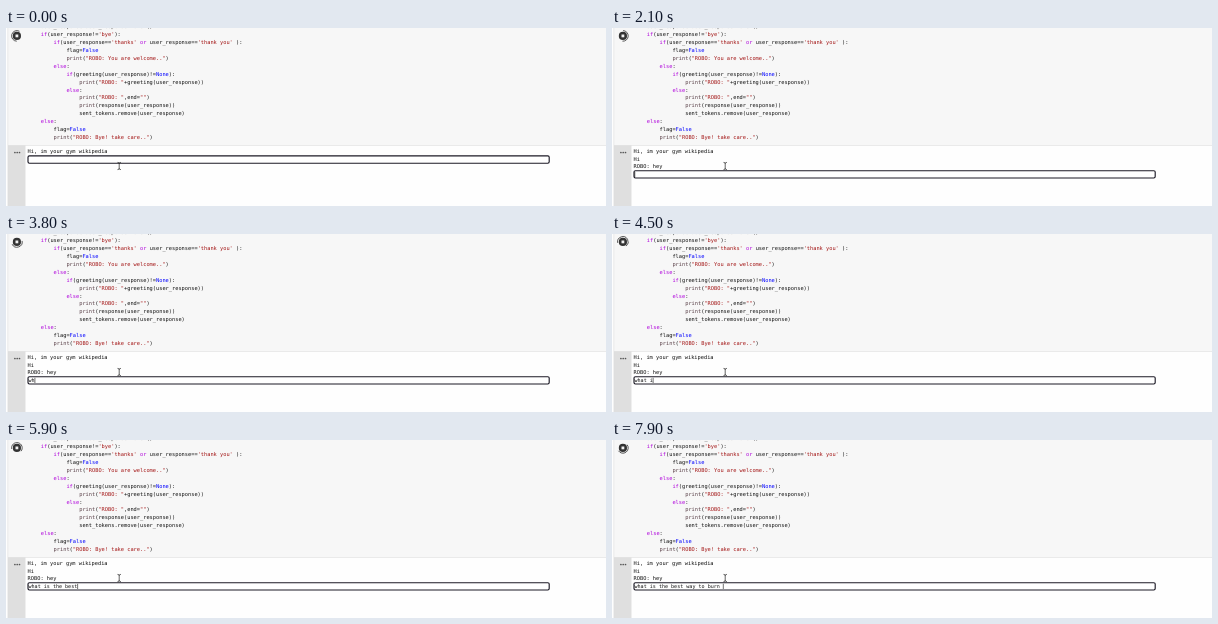
Write an HTML page that moves like this. It is 600 px wide and 178 px high and loops after 8000 ms.

```html
<!DOCTYPE html>
<html lang="en">
<head>
<meta charset="utf-8">
<title>Notebook chat</title>
<style>
  html, body { margin: 0; width: 100%; height: 100%; overflow: hidden; background: #fff; }
  svg { display: block; width: 600px; height: 178px; }
  text {
    font: 5.32px "DejaVu Sans Mono", "Liberation Mono", monospace;
    white-space: pre;
    text-rendering: geometricPrecision;
    fill: #111;
  }
  #typed { font-size: 5.07px; }
  .keyword { fill: #af00db; }
  .string { fill: #a31515; }
  .builtin { fill: #5a4048; }
  .constant { fill: #0000ff; }
</style>
</head>
<body>
<svg viewBox="0 0 600 178">
  <rect width="600" height="178" fill="#fefefe"/>
  <rect x="2" width="598" height="117.5" fill="#f7f7f7"/>
  <rect x="2" y="117" width="17.5" height="61" fill="#dfdfdf"/>
  <path d="M2 117.5H600" stroke="#e4e4e4" stroke-width=".7"/>
  <path d="M1.8 0V178" stroke="#dedede" stroke-width=".6"/>
  <g id="code"></g>

  <g transform="translate(10.9 7.9)">
    <circle r="4.1" fill="#333"/>
    <rect x="-1.4" y="-1.4" width="2.8" height="2.8" fill="#f2f2f2"/>
    <path id="spinner" fill="none" stroke="#444" stroke-width=".9"/>
  </g>

  <g fill="#555">
    <circle cx="8.9" cy="124.5" r=".85"/>
    <circle cx="11.2" cy="124.5" r=".85"/>
    <circle cx="13.5" cy="124.5" r=".85"/>
  </g>

  <g id="output"></g>
  <g id="prompt">
    <rect x="22" y="127.9" width="521.2" height="7.3" rx="1.4" fill="#fff" stroke="#1c1a26" stroke-width="1.15"/>
    <text id="typed" x="22.5" y="133.2"></text>
    <path id="caret" stroke="#111" stroke-width=".6"/>
  </g>

  <path d="M111.5 134.4Q113.2 134.4 113.2 135.4Q113.2 134.4 114.9 134.4M113.2 135V141M111.5 141.6Q113.2 141.6 113.2 140.6Q113.2 141.6 114.9 141.6"
        fill="none" stroke="#222" stroke-width=".7"/>
</svg>
<script>
const LOOP = 8000;
const CHAR = 5.32 * 0.602;
const INPUT_CHAR = 5.07 * 0.602;
const LINE = 7.4;
const SENT = 1700, REPLIED = 1900;
const QUESTION = 'what is the best way to burn ';

// [time in ms, characters present]
const GREETING_KEYS = [[1000, 0], [1250, 2]];
const QUESTION_KEYS = [[3450, 0], [3800, 2], [5100, 10], [6800, 23], [7850, 29]];

const CODE = `user_response=user_response.lower()
if(user_response!='bye'):
    if(user_response=='thanks' or user_response=='thank you' ):
        flag=False
        print("ROBO: You are welcome..")
    else:
        if(greeting(user_response)!=None):
            print("ROBO: "+greeting(user_response))
        else:
            print("ROBO: ",end="")
            print(response(user_response))
            sent_tokens.remove(user_response)
else:
    flag=False
    print("ROBO: Bye! take care..")`.split('\n');

const $ = id => document.getElementById(id);

function add(parent, tag, attrs, content = '') {
  const node = document.createElementNS('http://www.w3.org/2000/svg', tag);
  for (const name in attrs) node.setAttribute(name, attrs[name]);
  node.textContent = content;
  return parent.appendChild(node);
}

function classify(token) {
  if (/^['"]/.test(token)) return 'string';
  if (/^(if|else|or)$/.test(token)) return 'keyword';
  if (/^(None|False)$/.test(token)) return 'constant';
  return token === 'print' ? 'builtin' : '';
}

CODE.forEach((line, row) => {
  const source = line.trimStart();
  const indent = line.length - source.length;
  const text = add($('code'), 'text', { x: 34.8 + indent * CHAR, y: 0.4 + row * 7.89 });
  for (const token of source.match(/'[^']*'|"[^"]*"|\w+|[^\w'"]+/g)) {
    add(text, 'tspan', { class: classify(token) }, token);
  }
});

const [, sentLine, replyLine] = ['Hi, im your gym wikipedia', 'Hi', 'ROBO: hey'].map(
  (words, row) => add($('output'), 'text', { x: 21.6, y: 125.3 + row * LINE }, words));

function typedCount(keys, time) {
  let count = 0;
  for (let i = 1; i < keys.length; i++) {
    const [t0, n0] = keys[i - 1], [t1, n1] = keys[i];
    if (time >= t0) count = n0 + (n1 - n0) * Math.min(1, (time - t0) / (t1 - t0));
  }
  return Math.floor(count + 1e-6);
}

function caretVisible(time) {
  if (time < 1000) return time >= 200 && time < 700;
  if (time >= REPLIED && time < 3450) return (time - REPLIED) % 1000 < 500;
  return true;
}

function drawSpinner(time) {
  const radius = 5.3;
  const start = time / 1400 * 2 * Math.PI + 1.6;
  const sweep = 3.6 + 0.9 * Math.sin(time / LOOP * 12 * Math.PI);
  const point = a => `${radius * Math.cos(a)} ${radius * Math.sin(a)}`;
  $('spinner').setAttribute('d',
    `M${point(start)}A${radius} ${radius} 0 ${sweep > Math.PI ? 1 : 0} 1 ${point(start + sweep)}`);
}

function show(node, visible) {
  node.setAttribute('visibility', visible ? 'inherit' : 'hidden');
}

function render(time) {
  const replied = time >= REPLIED;
  const value = replied
    ? QUESTION.slice(0, typedCount(QUESTION_KEYS, time))
    : 'Hi'.slice(0, typedCount(GREETING_KEYS, time));

  show(sentLine, time >= SENT);
  show(replyLine, replied);
  show($('prompt'), time < SENT || replied);
  $('prompt').setAttribute('transform', `translate(0 ${replied ? 2 * LINE : 0})`);
  $('typed').textContent = value;
  $('caret').setAttribute('d', `M${22.8 + value.length * INPUT_CHAR} 129V134.2`);
  show($('caret'), caretVisible(time));
  drawSpinner(time);
}

const began = performance.now();
function tick() {
  render((performance.now() - began) % LOOP);
  requestAnimationFrame(tick);
}
tick();
</script>
</body>
</html>
```
